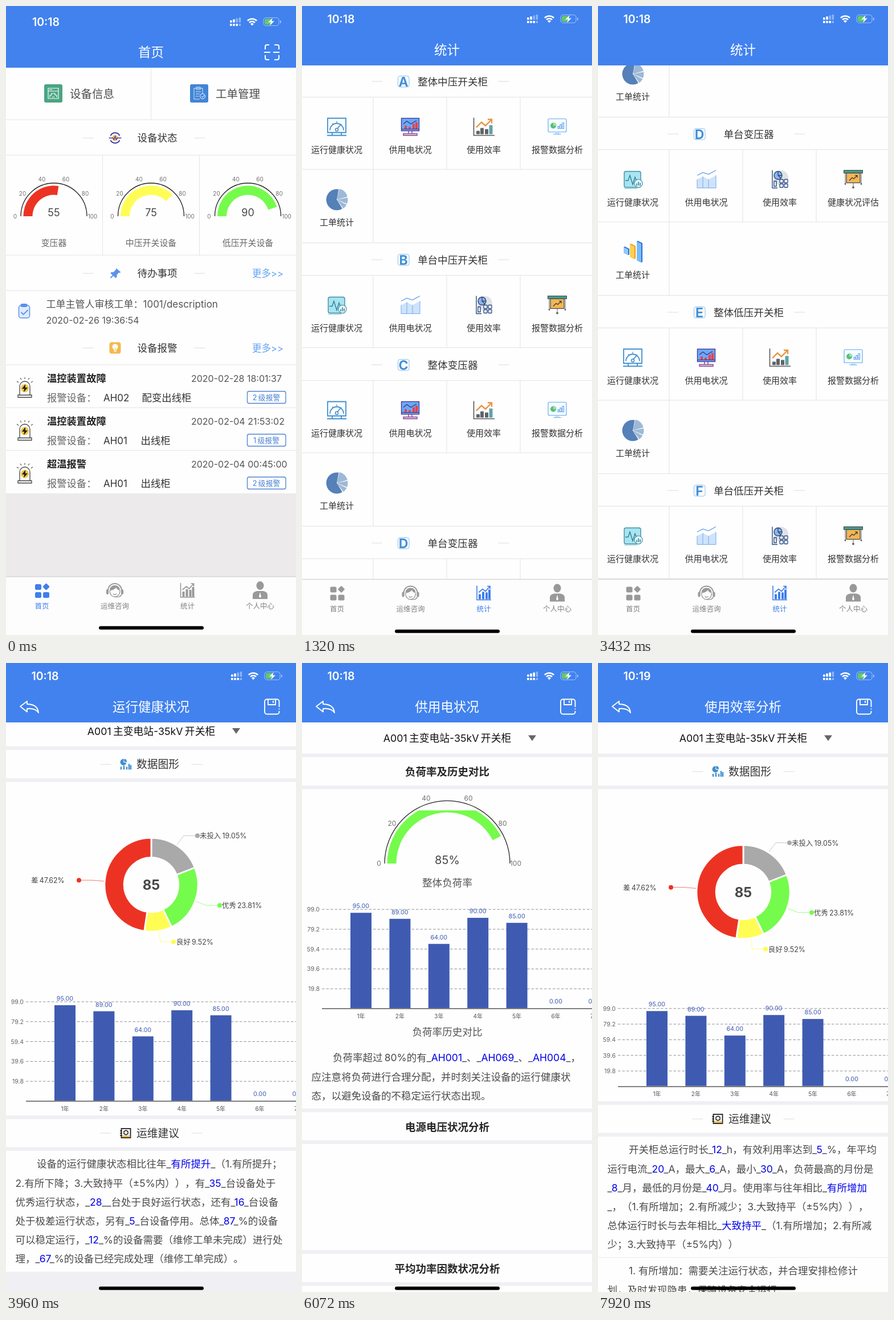
These frames come from a looping animation (509x1101 px, 8000 ms). An HTML page:

```html
<!DOCTYPE html>
<html lang="zh-CN">
<head>
<meta charset="utf-8">
<title>设备运维</title>
<style>
html, body { margin: 0; width: 100%; height: 100%; overflow: hidden; background: #fff; }
.page {
  position: absolute; inset: 0; width: 100%; height: 100%;
  font-family: Inter, "Noto Sans CJK SC", "Noto Sans CJK", sans-serif;
  text-spacing-trim: space-all;
  visibility: hidden;
  animation: show 8s step-end infinite;
  animation-delay: calc(var(--i) * 1.32s - 8s);
}
/* The last page is cut short by the first one coming back on top of it. */
.page:first-child { z-index: 1; }
@keyframes show {
  0% { visibility: visible; }
  16.5%, 100% { visibility: hidden; }
}
</style>
</head>
<body>
<script>
const BLUE = '#4182ef', RULE = '#e3e3e3', GAP = '#efeff4', PAPER = '#fefefe';

const rect = (x, y, w, h, fill, more = '') =>
  `<rect x="${x}" y="${y}" width="${w}" height="${h}" fill="${fill}" ${more}/>`;
const fill = (d, color) => `<path d="${d}" fill="${color}"/>`;
const stroke = (d, color, width = 1, more = '') =>
  `<path d="${d}" fill="none" stroke="${color}" stroke-width="${width}" ${more}/>`;
const dot = (x, y, r, color, more = '') => `<circle cx="${x}" cy="${y}" r="${r}" fill="${color}" ${more}/>`;
const at = (x, y, content) => `<g transform="translate(${x} ${y})">${content}</g>`;
const hline = (y, x1 = 0, x2 = 509, color = RULE) => stroke(`M${x1} ${y}H${x2}`, color);
const vline = (x, y1, y2) => stroke(`M${x} ${y1}V${y2}`, RULE);

// cy is the optical middle of the line; {braces} mark blue words.
const text = (x, cy, str, size, color = '#333', anchor = 'start', weight = 400) =>
  `<text x="${x}" y="${cy + size * .37}" font-size="${size}" fill="${color}" text-anchor="${anchor}" font-weight="${weight}">` +
  str.replace(/>/g, '&gt;').replace(/\{(.*?)\}/g, '<tspan fill="#0000e8">$1</tspan>') + '</text>';
const mid = (x, cy, str, size, color, weight) => text(x, cy, str, size, color, 'middle', weight);
const paragraph = (cy, lines) => lines.map((line, i) =>
  text(i ? 16.5 : 54, cy + i * 33.2, line, 17.5, '#4a4a4a')).join('');

// Degrees run clockwise from twelve o'clock.
const polar = (deg, r) => {
  const a = deg * Math.PI / 180;
  return `${(r * Math.sin(a)).toFixed(2)} ${(-r * Math.cos(a)).toFixed(2)}`;
};
const sector = (from, to, inner, outer, color, more = '') => {
  const big = to - from > 180 ? 1 : 0;
  return `<path d="M${polar(from, outer)}A${outer} ${outer} 0 ${big} 1 ${polar(to, outer)}L${polar(to, inner)}` +
    `A${inner} ${inner} 0 ${big} 0 ${polar(from, inner)}Z" fill="${color}" ${more}/>`;
};

const icon = {
  window: rect(-16, -16, 32, 32, '#4aa583', 'rx="3"') +
    stroke('M-9-9H9V9H-9ZM-9-4H9M-7-6.5H-2', '#fff', 1.2) +
    stroke('M-6 7V3H-3V0H3V3H6V7M-2 7A2.5 2.5 0 0 1 2 7', '#fff', 1.2),
  order: rect(-16, -16, 32, 32, '#4285d6', 'rx="3"') +
    stroke('M-9-9H6V1M1 10H-9V-9M-5-11H2V-7H-5ZM-6-3H3M-6 1H1M-6 5H-1', '#d5e5fa', 1) +
    dot(6, 5, 4.5, '#4285d6', 'stroke="#fff"') + stroke('M4 5L6 7L9 3', '#fff', 1),
  state: stroke('M-8-4A9 9 0 0 1 8-4M-8 4A9 9 0 0 0 8 4', '#4540a8', 2) +
    dot(0, 0, 5, '#f3b548') + stroke('M-11 0H-4L-2 3L0-3L2 3L4 0H11', '#4540a8', 1.3),
  pin: fill('M2-9L10-2L8-1L6-1L3 3V7L1 8L-8 0L-7-2L-3-2L1-6Z', '#5b91ee') + stroke('M-3 3L-8 8', '#5b91ee', 2),
  bulb: rect(-10, -10, 20, 20, '#f3b94e', 'rx="4"') + dot(0, -2, 5, '#fff') +
    rect(-2, 2, 4, 5, '#fff') + stroke('M0-1V7', '#f3b94e', 1),
  clipboard: rect(-9, -10, 19, 22, '#dfebff', 'rx="4" stroke="#5b8fea" stroke-width="1.5"') +
    rect(-6, -13, 12, 6, '#5b8fea', 'rx="3"') + stroke('M-5 2L-1 6L7-2', '#5b8fea', 1.8),
  siren: stroke('M-9 14V-1A9 9 0 0 1 9-1V14M-12 18V14H12V18Z', '#444', 1.3) +
    dot(0, 2, 7, '#f4c542') + fill('M1-5L-5 3H-1L-2 9L5 1H1Z', '#222') +
    stroke('M0-14V-17M-6-13L-8-16M6-13L8-16M-11-8L-14-10M11-8L14-10', '#555', 1.2),
  meter: stroke('M-16-15H16V10H-16ZM-12 6A12 12 0 0 1 12 6M1 3L8-5M-8 10V15M8 10V15M-17 15H17', '#3f8fd0', 1.8) +
    stroke('M0-10V-7M-8-6L-6-4', '#3f8fd0', 1.3) + dot(0, 5, 2.5, PAPER, 'stroke="#3f8fd0" stroke-width="1.5"'),
  monitor: rect(-15.5, -15, 31, 22, '#6aa9f8', 'stroke="#4b3b94" stroke-width="1.4"') +
    [[-10, 6], [-3, 4], [4, 9], [9, 12]].map(([x, h]) => rect(x, 4 - h, 4, h, '#e8414c')).join('') +
    stroke('M-12-5L-6-10L1-5L11-11', '#3c2d80', 1.2) + stroke('M-15 4H15', '#3c2d80', 1) +
    stroke('M-3 7V12H3V7M-12 12H12V15H-12Z', '#7a3fae', 1.4) + hline(14, -11, 11, '#f0b04c'),
  growth: stroke('M-17.5-16V15H19', '#555', 1.6) +
    [[-13, 6], [-6, 11], [2, 9]].map(([x, h]) => rect(x, 13 - h, 6, h, '#5f6468', 'rx="1"')).join('') +
    rect(9.5, -3, 6, 16, '#5fa3a9', 'rx="1"') +
    stroke('M-13 1L-4-8L3-2L13-12M7-13H14V-6', '#ea9440', 2.4),
  screen: rect(-16, -14, 32, 23, '#f7fbff', 'rx="2" stroke="#62aef2" stroke-width="1.2"') +
    dot(-7, -2, 5, '#57c07a') + fill('M-7-2V-8A6 6 0 0 1-1-2Z', '#a5dfb8') +
    [[1, 4], [5, 7], [9, 10]].map(([x, h]) => rect(x, 3 - h, 2.5, h, '#eaf4ff', 'stroke="#4b98ea" stroke-width=".9"')).join('') +
    stroke('M-2 9V12M2 9V12M-7 13A8 2 0 0 1 7 13Z', '#8cc4f5', 1),
  pie: sector(148, 371, 0, 18.5, '#5580b8') + sector(14, 74, 1.5, 19.5, '#9db9d6') +
    sector(79, 112, 1.5, 19.5, '#9db9d6') + sector(117, 143, 1.5, 19.5, '#9db9d6'),
  pulse: rect(-15, -14, 29, 28, '#a9e4f0', 'rx="3" stroke="#3f8ea5" stroke-width="1.4"') +
    stroke('M-13 2H-8L-5-7L0 9L4-4L6 1H12', '#2e7f96', 1.4) + hline(16, -15, 8, '#7bc4d2') +
    dot(10, 7, 7, '#eefbfd', 'stroke="#3f8ea5" stroke-width="1.2"') +
    stroke('M7 11V7M10 11V4M13 11V6', '#3f8ea5', 1.8),
  area: fill('M-16 0L-6-5L4 0L17-7V15H-16Z', '#cfe3fb') +
    stroke('M-16 0V15H17V-7M-6-5V15M4 0V15', '#73a9ec', 1) +
    stroke('M-16-7L-6-12L4-9L17-16', '#5b9bea', 1.2),
  tiles: dot(2, -3, 13, '#e0e2e6') +
    stroke('M-13-16V15H-4M-10 12V3H-6V12Z', '#29497f', 1.4) +
    dot(-3, -7, 7, '#8fb4e4', 'stroke="#29497f" stroke-width="1.4"') + stroke('M-3-14V-7L4-7M-3-7L2-2', '#29497f', 1.3) +
    [[0, 0], [8, 0], [0, 8], [8, 8]].map(([x, y]) => rect(x, y, 6, 6, '#f4f8ff', 'rx="1" stroke="#29497f" stroke-width="1.3"')).join(''),
  board: rect(-16.5, -16, 33, 5, '#439c8f', 'stroke="#444"') +
    rect(-12, -11, 24, 17, '#f3b655', 'stroke="#444" stroke-width="1.2"') +
    stroke('M-7 2L-2-3L1-1L7-7M3-7H7V-3', '#333', 1.2) +
    stroke('M-14-11V7M14-11V7M0 6V12', '#666', 1) + dot(-14, 8, 1.3, '#444') + dot(14, 8, 1.3, '#444') + dot(0, 14, 2, '#666'),
  blocks: fill('M-16-9L-14-10L-6-6V4L-8 5L-16 1Z', '#2e6ddb') + fill('M-16-9L-8-5V5L-16 1Z', '#8fcaf9') +
    fill('M-5-14L-3-15L5-11V11L3 12L-5 8Z', '#f09a2c') + fill('M-5-14L3-10V12L-5 8Z', '#fcd04c') +
    fill('M7-19L9-20L17-16V17L15 18L7 14Z', '#2e6ddb') + fill('M7-19L15-15V18L7 14Z', '#78bdf8'),
  data: at(-4, -4, sector(105, 370, 0, 5.5, '#3d8fd2') + at(1, -1, sector(10, 105, 0, 5, '#3d8fd2'))) +
    stroke('M-8 9V4M-3 9V2M2 9V4M6 9V-1M9 9V1', '#3d8fd2', 2.4),
  book: rect(-7.5, -8, 16, 16, '#fff', 'stroke="#222" stroke-width="1.8"') + rect(-6, 4, 13.5, 3, '#f5c344') +
    stroke('M.5-5L4-3V1L.5 3L-3 1V-3Z', '#222', 1.5) + stroke('M-10-4H-6M-10 0H-6M-10 4H-6', '#222', 1.3),
};

const tabIcon = {
  home: c => [[-12, -11], [-12, 3], [2, 3]].map(([x, y]) => rect(x, y, 11, 10, c, 'rx="2.5"')).join('') +
    rect(-4.5, -4.5, 9, 9, c, 'rx="1.5" transform="translate(7.5 -6.5) rotate(45)"'),
  help: c => stroke('M-12 0A12 12 0 0 1 12 0', c, 2) + rect(-15, -2, 4, 9, c, 'rx="2"') + rect(11, -2, 4, 9, c, 'rx="2"') +
    fill('M-9 0C-9-12 9-12 9 0C4-1 3-4 2-5C0-2-5 0-9 0Z', c) +
    stroke('M-9 0C-9 15 9 15 9 0M12 6C11 11 6 12 1 11', c, 1.3) + stroke('M-3 6A4 4 0 0 0 3 6', c, 1.2),
  chart: c => stroke('M-12-13V12H13', c, 1.6) +
    [[-9, 9], [-3, 13], [3, 12], [8, 17]].map(([x, h]) => rect(x, 11 - h, 4, h, c)).join('') +
    stroke('M-9-1L-2-7L3-3L11-12M6-12H11V-7', c, 1.7),
  user: c => `<ellipse cx="0" cy="-8.5" rx="6.5" ry="7.5" fill="${c}"/>` +
    fill('M-13 15V8C-13 3-8 1-4 1H4C8 1 13 3 13 8V15Z', c) + fill('M0 3L2 11L0 13L-2 11Z', '#fff'),
};

const status = (time, bars, first) => at(first ? 1.5 : 0, first ? 5 : 0,
  mid(68.5, 23, time, 19.5, '#fff', 600)) + at(first ? -2 : 0, first ? 5 : 0,
  [0, 1, 2, 3].map(k => rect(395 + k * 5.2, 26, 3.6, 4, '#fff', `rx="1" opacity="${k < 3 ? 1 : .4}"`) +
    rect(395 + k * 5.2, 20 - k * 1.7, 3.6, 4 + k * 1.7, '#fff', `rx="1" opacity="${k < bars ? 1 : .4}"`)).join('') +
  at(434, 23, stroke('M-8.1-2.1A11.5 11.5 0 0 1 8.1-2.1M-5 1.1A7 7 0 0 1 5 1.1', '#fff', 2.6) +
    fill('M0 6.5L-3 3.3A4 4 0 0 1 3 3.3Z', '#fff')) +
  rect(454, 15.5, 27, 14, 'none', 'rx="4.2" stroke="#fff" stroke-opacity=".5"') +
  rect(456, 17.5, 13, 10, '#65c968', 'rx="2.5"') +
  fill('M483 20V25.5A3 3 0 0 0 483 20Z', '#b5cdf5') + fill('M470 16L462 23.5H467L465 29L473 21.5H468Z', '#fff'));

const header = (title, height = 104) =>
  rect(0, 0, 509, height, BLUE) + mid(254.5, height - 27, title, 22.5, '#fff');
const backBar = title => header(title) +
  stroke('M37 67L25 76L37 85.5V80C46 79 53 81 57 87C56 77 49 72 37 72Z', '#fff', 1.9, 'stroke-linejoin="round"') +
  rect(454, 63.5, 25.5, 26, 'none', 'rx="4" stroke="#fff" stroke-width="1.9"') +
  stroke('M460 64V73H473V64M469 66V70', '#fff', 1.8) + rect(478, 77, 4, 7, BLUE) + dot(479.5, 80.5, 1, '#fff');
const indicator = cy => rect(163, cy - 3, 184, 6, '#000', 'rx="3"');

const tabBar = (active, first) => {
  const top = first ? 999 : 1003.5, xs = first ? [63, 191, 318.5, 446] : [61.5, 190.5, 319, 448];
  return rect(0, top, 509, 110, '#fdfdfd') + hline(top, 0, 509, '#c9c9c9') +
    [['home', '首页'], ['help', '运维咨询'], ['chart', '统计'], ['user', '个人中心']].map(([key, label], k) => {
      const on = k === active;
      return at(xs[k], top + 24, tabIcon[key](on ? '#3f7fee' : '#999')) +
        mid(xs[k], top + 51.5, label, 12.5, on ? '#3f7fee' : '#808080');
    }).join('') + indicator(first ? 1088.5 : 1094.5);
};

const heading = (cy, label, art, artX, left, right, size, cx) =>
  hline(cy, left, left + 19, '#dcdcdc') + hline(cy, right, right + 19, '#dcdcdc') +
  at(artX, cy, art) + mid(cx, cy, label, size);

const gauge = (cx, cy, r, value, color, labelSize, cover = '') => {
  const band = sector(-90, -90 + value * 1.8, r - 20.5, r - 4.5, color);
  const labels = [0, 20, 40, 60, 80, 100].map(v => {
    const a = Math.PI * (1 - v / 100);
    return mid((r + 10) * Math.cos(a), -(r + 10) * Math.sin(a), `${v}`, labelSize, '#707070');
  }).join('');
  return at(cx, cy, band + cover + stroke(`M${-r} 0A${r} ${r} 0 0 1 ${r} 0`, '#222', 1.3) + labels);
};

function homePage() {
  const top = (cy, label, art) => heading(cy, label, art, 191.5, 135, 330, 17.5, 265.5);
  const more = cy => text(432, cy, '更多>>', 16.5, '#5fa3f3');
  const gauges = [[84, 55, '#ec3323', '变压器'], [254.5, 75, '#fffd54', '中压开关设备'], [424.5, 90, '#75fb4c', '低压开关设备']];
  const alarms = [['温控装置故障', '2020-02-28 18:01:37', 'AH02', '配变出线柜', 2],
    ['温控装置故障', '2020-02-04 21:53:02', 'AH01', '出线柜', 1],
    ['超温报警', '2020-02-04 00:45:00', 'AH01', '出线柜', 2]];
  return rect(0, 0, 509, 1101, '#eceaeb') + rect(0, 100, 509, 753, PAPER) + header('首页', 108) + status('10:18', 2, true) +
    stroke('M455 76V71Q455 68 458 68H462M471 68H476Q479 68 479 71V76M479 86V91Q479 94 476 94H471M462 94H458Q455 94 455 91V86M453 81H464M469 81H480', '#fff', 2) +
    at(83, 153, icon.window) + text(112, 154, '设备信息', 19.5, '#4d4d4d') +
    at(339, 153, icon.order) + text(368, 154, '工单管理', 19.5, '#4d4d4d') +
    [199, 261, 436, 498, 628, 703, 778].map(y => hline(y)).join('') +
    vline(254.5, 108, 199) + vline(169.5, 261, 436) + vline(339.5, 261, 436) +
    top(231, '设备状态', icon.state) +
    gauges.map(([x, v, color, label]) => gauge(x, 368, 58, v, color, 10) +
      mid(x, 361, `${v}`, 18, '#484848') + mid(x, 414, label, 14.9, '#666')).join('') +
    top(468, '待办事项', icon.pin) + more(468) +
    at(31.5, 534, icon.clipboard) + text(70.5, 522, '工单主管人审核工单：1001/description', 17, '#555') +
    text(70.5, 550, '2020-02-26 19:36:54', 16, '#555') +
    top(598.5, '设备报警', icon.bulb) + more(598.5) +
    alarms.map(([name, date, code, place, level], k) => at(0, 628 + 75 * k,
      at(33, 39, icon.siren) + text(72, 24, name, 17.3, '#222', 'start', 600) + text(325, 24, date, 16, '#555') +
      text(72, 57.5, '报警设备：', 17.3, '#666') + text(171, 57.5, code, 17) + text(k ? 236.5 : 238.5, 57.5, place, 17.4) +
      rect(423.5, 46.5, 67.5, 21, PAPER, 'rx="3" stroke="#4b82d2" stroke-width="1.3"') +
      mid(457, 57, `${level}\u2009级报警`, 12.8, '#4b82d2'))).join('') +
    tabBar(0, true);
}

function listPage(scroll) {
  const xs = [61, 190, 319, 448];
  const whole = ['meter', 'monitor', 'growth', 'screen'], single = ['pulse', 'area', 'tiles', 'board'];
  const groups = [['整体中压开关柜', whole, 'pie'], ['单台中压开关柜', single], ['整体变压器', whole, 'pie'],
    ['单台变压器', single, 'blocks'], ['整体低压开关柜', whole, 'pie'], ['单台低压开关柜', single]];
  const cell = (k, y, art, label) => at(xs[k], y + 52.5, icon[art]) + mid(xs[k], y + 92, label, 15);
  let y = 102, out = '';
  groups.forEach(([title, arts, extra], g) => {
    const letter = rect(-9.5, -9.5, 19.5, 19.5, PAPER, 'rx="3.5" stroke="#8dbfea"') +
      mid(0, 0, 'ABCDEF'[g], 23, '#4391d8', 700);
    out += heading(y + 30, title, letter, 178, 122, 344, 17.6, 264.5) + hline(y + 57.5);
    y += 57;
    const labels = ['运行健康状况', '供用电状况', '使用效率', g === 3 ? '健康状况评估' : '报警数据分析'];
    out += arts.map((art, k) => cell(k, y, art, labels[k])).join('') +
      [125, 254, 383].map(x => vline(x, y, y + 127)).join('') + hline(y + 127);
    y += 127;
    if (extra) {
      out += cell(0, y + .5, extra, '工单统计') + vline(125, y, y + 128) + hline(y + 128.5);
      y += 128;
    }
  });
  return rect(0, 0, 509, 1101, PAPER) +
    `<svg x="0" y="104" width="509" height="900">${at(0, -104 - scroll, out)}</svg>` +
    header('统计') + status('10:18', 2) + tabBar(2);
}

function barChart(axis, step) {
  const values = [95, 89, 64, 90, 85, 0, 0], scale = step * 5 / 99;
  return [1, 2, 3, 4, 5].map(k => stroke(`M35 ${axis - k * step}H509`, '#909090', 1, 'stroke-dasharray="4.5 3"') +
      text(31, axis - k * step, (k * 19.8).toFixed(1), 10.6, '#666', 'end')).join('') +
    values.map((v, k) => {
      const x = 103.5 + k * 68.4, h = v * scale;
      return rect(x - 18.5, axis - 1 - h, 37, h, '#3f5bb1') +
        mid(x, axis - 13 - h, v.toFixed(2), 10.8, '#3f5bb1') + mid(x, axis + 13, `${k + 1}年`, 10, '#555');
    }).join('') + stroke(`M35 ${axis}H509`, '#555', 1.4);
}

const gaps = (...ys) => ys.map(y => rect(0, y, 509, 6.3, GAP)).join('');
const picker = cy => mid(255, cy, 'A001\u2009主变电站-35kV\u2009开关柜', 17.8, '#111') +
  fill(`M397 ${cy - 5}H411L404 ${cy + 5}Z`, '#666');
const subhead = (cy, label, art) => heading(cy, label, art, 210, 165.5, 325.5, 18.8, 266.5);

function donut() {
  const parts = [
    [19.05, '#a9a9a9', '未投入', 'M44-69L57-86H81', 81, -86, 85],
    [23.81, '#75fb4c', '优秀', 'M76 28L96 36H120', 120, 36, 124],
    [9.52, '#fffd54', '良好', 'M13 79L16 100H39', 39, 100, 44],
    [47.62, '#ec3323', '差', 'M-80-6L-104-8H-127', -127, -8, -211]];
  let from = 0;
  return parts.map(([share, color, name, lead, x, y, tx]) => {
    const to = from + share * 3.6;
    const part = stroke(lead, color, 1, 'opacity=".65"') + dot(x, y, 4, color) +
      sector(from, to, 47.8, 82, color, 'stroke="#fff" stroke-width="2.8"') +
      text(tx, y + .5, `${name}\u2009${share.toFixed(2)}%`, 12.4, '#444');
    from = to;
    return part;
  }).join('') + mid(0, 0, '85', 24, '#484848', 700);
}

function reportPage(title, time, bars, shift, axis, step, adviceY, lines, tail) {
  return rect(0, 0, 509, 1101, PAPER) + at(0, -shift, picker(131.5) + gaps(158.5, 214.5) +
      subhead(190, '数据图形', icon.data) + at(255, 400.7, donut())) +
    barChart(axis, step) + gaps(adviceY - 31, adviceY + 24.5) + subhead(adviceY, '运维建议', icon.book) +
    paragraph(adviceY + 54, lines) + tail + backBar(title) + status(time, bars) + indicator(1094.5);
}

const healthPage = () => reportPage('运行健康状况', '10:18', 2, 12.5, 767, 34.8, 823, [
  '设备的运行健康状态相比往年_{有所提升}_（1.有所提升；',
  '2.有所下降；3.大致持平（±5%内）），有_{35}_台设备处于',
  '优秀运行状态，_{28}__台处于良好运行状态，还有_{16}_台设备',
  '处于极差运行状态，另有_{5}_台设备停用。总体_{87}_%的设备',
  '可以稳定运行，_{12}_%的设备需要（维修工单未完成）进行处',
  '理，_{67}_%的设备已经完成处理（维修工单完成）。',
], rect(0, 1065.5, 509, 36, GAP));

const efficiencyPage = () => reportPage('使用效率分析', '10:19', 3, 0, 741.5, 27.35, 798, [
  '开关柜总运行时长_{12}_h，有效利用率达到_{5}_%，年平均',
  '运行电流_{20}_A，最大_{6}_A，最小_{30}_A，负荷最高的月份是',
  '_{8}_月，最低的月份是_{40}_月。使用率与往年相比_{有所增加}',
  '_，（1.有所增加；2.有所减少；3.大致持平（±5%内）），',
  '总体运行时长与去年相比_{大致持平}_（1.有所增加；2.有所减',
  '少；3.大致持平（±5%内））',
], hline(1040.5, 0, 509, '#ececec') + paragraph(1064, [
  '1. 有所增加：需要关注运行状态，并合理安排检修计',
  '划，及时发现隐患，保障设备安全运行；']));

function areaDialog() {
  const rows = ['A001主变电站-35kV开关柜', 'A001主变电站-10kV开关柜', 'B001 1#分变电站-35kV开关柜', 'C001 2#分变电站-35kV开关柜'];
  return rect(0, 0, 509, 1101, '#000', 'opacity=".4"') + rect(60, 396, 390, 310, '#fff', 'rx="10"') +
    fill('M60 445.5V406Q60 396 70 396H440Q450 396 450 406V445.5Z', BLUE) + mid(254.5, 421, '设备区域', 21.2, '#fff') +
    rows.map((row, k) => mid(254.5, 475 + k * 55.8, row, 16.7, '#111') +
      (k ? hline(445.3 + k * 55.8, 60, 450, '#e4e4e6') : '')).join('') +
    fill('M60 656.5H450V696Q450 706 440 706H70Q60 706 60 696Z', '#e9e9eb') + mid(254.5, 682, '关闭', 21, '#2f7df0');
}

function loadPage(time, overlay = '') {
  const title = (cy, label) => mid(255, cy, label, 18.5, '#262626', 600);
  return rect(0, 0, 509, 1101, PAPER) + picker(131.5) + gaps(158.5, 214.5, 780, 835.5, 1028, 1084) +
    title(190, '负荷率及历史对比') +
    gauge(255, 351, 110, 85, '#75fb4c', 12, rect(-70, -108, 140, 15, PAPER)) +
    mid(255, 345, '85%', 20, '#484848') + mid(255, 384, '整体负荷率', 17.6, '#555') +
    barChart(605, 34.75) + mid(255, 645, '负荷率历史对比', 17.6, '#555') +
    paragraph(691, [
      '负荷率超过\u200980%的有_{AH001}_、_{AH069}_、_{AH004}_，',
      '应注意将负荷进行合理分配，并时刻关注设备的运行健康状',
      '态，以避免设备的不稳定运行状态出现。']) +
    title(812, '电源电压状况分析') + title(1060, '平均功率因数状况分析') +
    backBar('供用电状况') + overlay + status(time, 3) + indicator(1094.5);
}

const pages = [homePage(), listPage(0), listPage(716), healthPage(),
  loadPage('10:18'), loadPage('10:19', areaDialog()), efficiencyPage()];
document.body.innerHTML = pages.map((content, i) =>
  `<svg class="page" style="--i:${i}" viewBox="0 0 509 1101">${content}</svg>`).join('');
</script>
</body>
</html>
```
